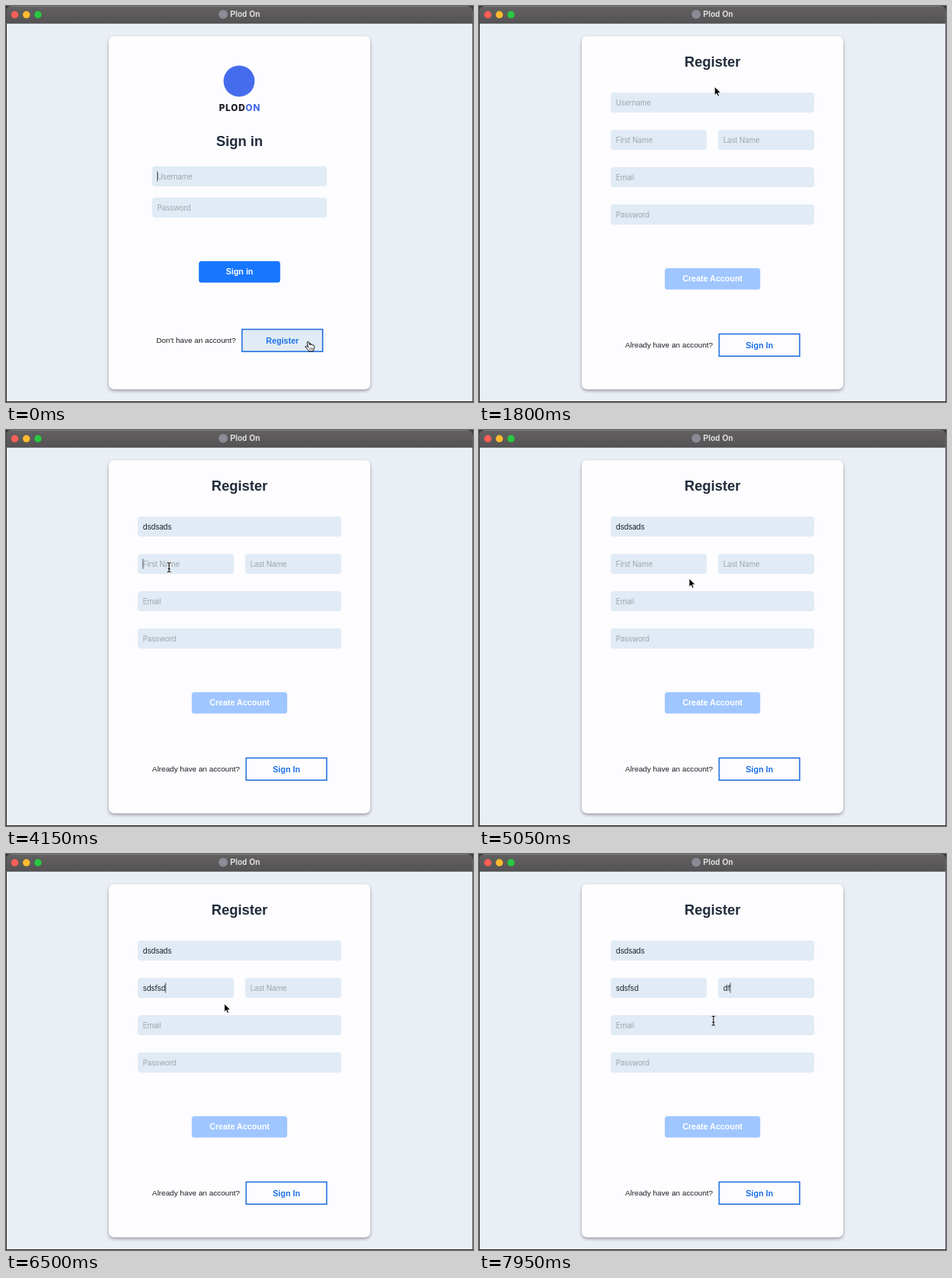
Animation, 600 px wide and 509 px high, one loop 8000 ms. Source, as an HTML page:

```html
<!DOCTYPE html>
<html lang="en">
<head>
<meta charset="utf-8">
<title>Register form</title>
<style>
html, body { margin: 0; width: 100%; height: 100%; overflow: hidden; background: #3a3a3c; }
svg { display: block; width: 100%; height: 100%; }
text { font-family: "Liberation Sans", Arial, sans-serif; white-space: pre; }
.h { font-weight: 700; font-size: 18px; fill: #202b3b; }
.b { font-weight: 700; font-size: 10.5px; }
.label { font-size: 9.75px; fill: #1d1d22; }
.in { font-family: Inter, Roboto, sans-serif; font-size: 9.75px; letter-spacing: -.28px; }
.mid { text-anchor: middle; }
.brand { font-family: Inter, sans-serif; font-weight: 800; font-size: 11.5px; letter-spacing: .8px; }
</style>
</head>
<body>
<svg id="stage" viewBox="0 0 600 509">
  <defs>
    <linearGradient id="bar" x2="0" y2="1">
      <stop stop-color="#626061"/><stop offset="1" stop-color="#555354"/>
    </linearGradient>
    <filter id="shade" x="-10%" y="-10%" width="120%" height="120%">
      <feDropShadow dx="0" dy="2" stdDeviation="2.2" flood-color="#000" flood-opacity=".38"/>
    </filter>
  </defs>
  <path d="M1 508V7Q1 .5 7 .5H593Q599.3 .5 599.3 7V508Z" fill="#eaeff6"/>
  <path d="M.5 22V7Q.5 .5 7 .5H593Q599.5 .5 599.5 7V22Z" fill="url(#bar)"/>
  <path d="M0 22.3H600" stroke="#454344" stroke-width=".8"/>
  <circle cx="11.3" cy="11.2" r="4.6" fill="#fe5f57"/>
  <circle cx="26.2" cy="11.2" r="4.6" fill="#febc2e"/>
  <circle cx="41.1" cy="11.2" r="4.6" fill="#28c840"/>
  <circle cx="279" cy="10.7" r="5.8" fill="#8c8b98"/>
  <text x="288" y="14.4" font-size="10" font-weight="700" fill="#e4e2e3">Plod On</text>
  <rect x="132" y="39" width="336" height="453.5" rx="7" fill="#fdfcfe" filter="url(#shade)"/>
  <g id="signIn">
    <circle cx="299.5" cy="96.5" r="20" fill="#456cec"/>
    <text class="brand mid" x="300.4" y="135" fill="#16181d">PLOD<tspan fill="#456cec">ON</tspan></text>
  </g>
  <g id="register"></g>
  <rect id="caret" width=".8" height="13" fill="#33363b"/>
  <g id="cursor" stroke-linejoin="round" stroke-linecap="round">
    <path id="arrow" d="M0 0V10.6L2.5 8.4L4.2 12.2L6 11.4L4.4 7.7H7.8Z" fill="#000" stroke="#fff" stroke-width=".8"/>
    <g id="beam" fill="none">
      <path d="M-2-6Q0-6 0-4.6Q0-6 2-6M0-4.6V4.6M-2 6Q0 6 0 4.6Q0 6 2 6M-1.2 2H1.2" stroke="#fff" stroke-width="2.2"/>
      <path d="M-2-6Q0-6 0-4.6Q0-6 2-6M0-4.6V4.6M-2 6Q0 6 0 4.6Q0 6 2 6M-1.2 2H1.2" stroke="#111" stroke-width="1.1"/>
    </g>
    <g id="hand">
      <path d="M-1.3 .4Q-.2-.8 .8 .5L1.7 4Q3-.1+3.4 4.1Q5 3 5.6 4.6Q7.6 4 7.9 6Q8 8.5 6.8 10.2L6.6 12.3H.6L.3 11Q-2.4 8.6-3.7 6.4Q-3.6 4.8-1.8 5.8L-.3 7.2Z" fill="#fff" stroke="#111" stroke-width="1"/>
      <path d="M2.2 8V10.4M3.8 8V10.4M5.4 8V10.4" stroke="#111" stroke-width=".6"/>
    </g>
  </g>
</svg>
<script>
const LOOP = 8000, SWITCH = 300, BLINK = 500;
const $ = id => document.getElementById(id);

function add(parent, tag, attrs, text) {
  const el = document.createElementNS("http://www.w3.org/2000/svg", tag);
  for (const k in attrs) el.setAttribute(k, attrs[k]);
  if (text) el.textContent = text;
  parent.append(el);
  return el;
}

const heading = (page, y, text) => add(page, "text", { class: "h mid", x: 300, y }, text);

function field(page, x, y, w, hint) {
  add(page, "rect", { x, y, width: w, height: 25.8, rx: 4, fill: "#e0ebf5" });
  const label = add(page, "text", { class: "in", x: x + 6.6, y: y + 16.7, fill: "#a2a6ab" }, hint);
  return { page, x, y, w, h: 25.8, hint, label };
}

function solid(page, x, y, w, fill, text) {
  add(page, "rect", { x, y, width: w, height: 27.5, rx: 3.5, fill });
  add(page, "text", { class: "b mid", x: x + w / 2, y: y + 17.4, fill: "#fff" }, text);
}

function outlined(page, x, y, text) {
  const box = add(page, "rect", { x, y, width: 103.5, height: 28.5, stroke: "#2873df", "stroke-width": 1.6 });
  add(page, "text", { class: "b mid", x: x + 51.8, y: y + 18, fill: "#1a70e6" }, text);
  return { page, x, y, w: 103.5, h: 28.5, box };
}

const one = $("signIn"), two = $("register");
heading(one, 179.6, "Sign in");
heading(two, 77.6, "Register");
const user = field(one, 187.7, 206, 224.6, "Username");
const pass = field(one, 187.7, 246.3, 224.6, "Password");
const nick = field(two, 169.2, 111.2, 261.6, "Username");
const first = field(two, 169.2, 159.2, 123.4, "First Name");
const last = field(two, 307.2, 159.2, 123.6, "Last Name");
const mail = field(two, 169.2, 207.2, 261.6, "Email");
const secret = field(two, 169.2, 255.1, 261.6, "Password");
solid(one, 247.7, 328, 104.6, "#1877ff", "Sign in");
solid(two, 238.7, 337, 122.6, "#a0c6ff", "Create Account");
add(one, "text", { class: "label", x: 193, y: 433.4 }, "Don't have an account?");
add(two, "text", { class: "label", x: 187.8, y: 439.4 }, "Already have an account?");
const buttons = [outlined(one, 303.3, 415.6, "Register"), outlined(two, 308.5, 421.6, "Sign In")];
const error = add(two, "text", { class: "mid", x: 300, y: 304.6, "font-size": 9, "font-weight": 700, fill: "#b8070f" });
const fields = [user, pass, nick, first, last, mail, secret];

// Key presses: text and the time of each letter
const typing = [
  { f: nick, text: "dsdsads", at: [2700, 2850, 3000, 3100, 3200, 3300, 3400], bad: "Invalid username." },
  { f: first, text: "sdsfsd", at: [5750, 5950, 6050, 6200, 6300, 6400], bad: "Invalid first name." },
  { f: last, text: "df", at: [7150, 7900], bad: "Invalid last name." }
];
const focus = [[0, user], [SWITCH, nick], [4100, first], [6950, last]];

// Pointer stops: time, x, y
const path = [
  [0, 388.3, 431.5], [200, 388.3, 431.5], [500, 386.5, 431], [950, 386.5, 431],
  [1650, 327, 97], [1750, 327, 97], [1850, 280, 110.8], [3500, 280, 110.8],
  [4050, 209.5, 176.5], [4500, 209.5, 176.5], [5200, 278, 193], [6450, 278, 193],
  [6900, 345.2, 178.5], [7450, 345.2, 178.5], [7950, 301.2, 214.2], [8000, 301.2, 214.2]
];

function pointer(t) {
  const i = path.findIndex(k => k[0] > t);
  const [t0, x0, y0] = path[i - 1], [t1, x1, y1] = path[i];
  const u = (t - t0) / (t1 - t0), e = u * u * (3 - 2 * u);
  return [x0 + (x1 - x0) * e, y0 + (y1 - y0) * e];
}

const show = (el, on) => el.setAttribute("display", on ? "inline" : "none");

function draw(t) {
  const page = t < SWITCH ? one : two;
  show(one, page === one);
  show(two, page === two);

  let [since, active] = focus.filter(k => k[0] <= t).pop();
  let message = "";
  for (const { f, text, at, bad } of typing) {
    const done = at.filter(a => a <= t);
    const n = f.typed = done.length;
    f.label.textContent = n ? text.slice(0, n) : f.hint;
    f.label.setAttribute("fill", n ? "#22252a" : "#a2a6ab");
    if (n === 1) message = bad;
    if (n && f === active) since = done[n - 1];
  }
  error.textContent = message;

  const width = active.typed ? active.label.getComputedTextLength() : 0;
  $("caret").setAttribute("x", active.x + 6.3 + width);
  $("caret").setAttribute("y", active.y + 6.4);
  show($("caret"), Math.floor((t - since) / BLINK) % 2 === 0);

  const [x, y] = pointer(t);
  const over = r => r.page === page && x >= r.x && x <= r.x + r.w && y >= r.y && y <= r.y + r.h;
  for (const b of buttons) b.box.setAttribute("fill", over(b) ? "#e1ebf6" : "#fdfcfe");
  const kind = buttons.some(over) ? "hand" : fields.some(over) ? "beam" : "arrow";
  for (const id of ["hand", "beam", "arrow"]) show($(id), id === kind);
  $("cursor").setAttribute("transform", `translate(${x} ${y})`);
}

const start = performance.now();
function tick() {
  draw((performance.now() - start) % LOOP);
  requestAnimationFrame(tick);
}
tick();
</script>
</body>
</html>
```
